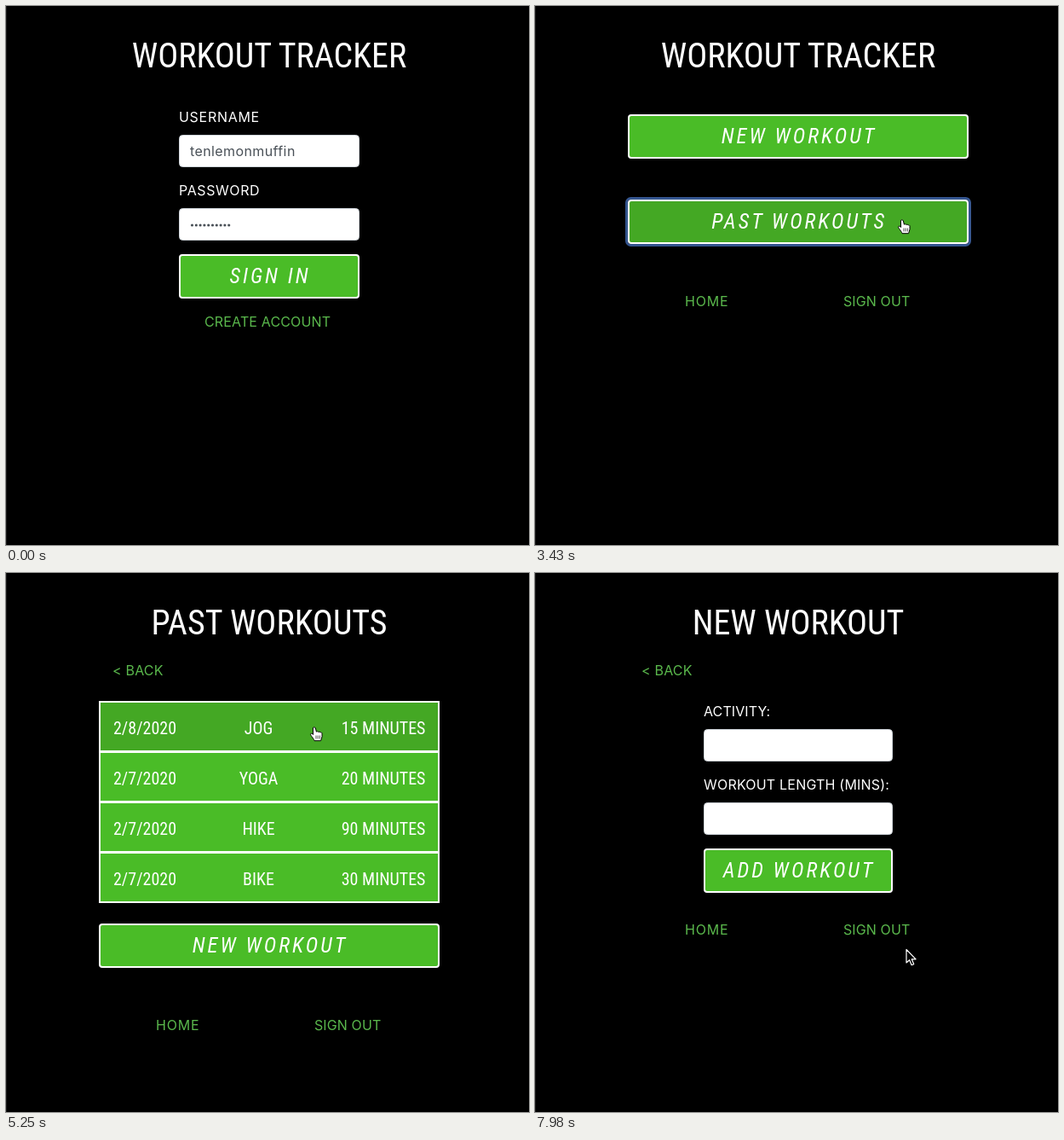
An HTML page that plays this animation: 614 by 632 pixels, repeating every 8000 ms.

```html
<!DOCTYPE html>
<html lang="en">
<head>
<meta charset="utf-8">
<title>Workout Tracker</title>
<style>
  html, body { margin: 0; width: 100%; height: 100%; overflow: hidden; background: #000; }
  svg { display: block; width: 614px; height: 632px; }
  text { fill: #fff; white-space: pre; }
  .cond { font-family: "Roboto Condensed", Roboto, sans-serif; font-stretch: condensed; }
  .sans { font-family: Montserrat, Inter, sans-serif; font-size: 16px; }
  .link { fill: #5ab84c; }
  .typed { fill: #495057; }
</style>
</head>
<body>
<svg id="stage" viewBox="0 0 614 632"></svg>
<script>
const LOOP = 8000, STEP = 70, FADE = 560;
const GREEN = "#4abc27", HOVER = "#44a824", RING = "#34558f";
const stage = document.getElementById("stage");

function el(parent, tag, attrs = {}, text) {
  const node = document.createElementNS("http://www.w3.org/2000/svg", tag);
  for (const key in attrs) node.setAttribute(key, attrs[key]);
  if (text) node.textContent = text;
  return parent.appendChild(node);
}
const show = (node, on) => node.setAttribute("visibility", on ? "visible" : "hidden");

el(stage, "rect", { width: 614, height: 632 });
el(stage, "rect", { width: 1, height: 632, fill: "#1c1c1c" });

// Narrow the regular face once if no condensed face is available.
const probe = el(stage, "text", { class: "cond", "font-size": 40 }, "WORKOUT TRACKER");
const narrow = probe.getComputedTextLength() > 345 ? 0.866 : 1;
probe.remove();

function cond(g, str, x, y, size, anchor = "middle", extra = {}) {
  return el(g, "text", {
    class: "cond", "font-size": size, "text-anchor": anchor,
    transform: `translate(${x} ${y}) scale(${narrow} 1)`, ...extra
  }, str);
}
function sans(g, str, x, y, gap = 0, kind = "") {
  return el(g, "text", { class: "sans " + kind, x, y, "letter-spacing": gap }, str);
}

function newPage(name, start, live) {
  const g = el(stage, "g");
  cond(g, name, 309, 72, 40);
  return { g, start, live, targets: [], ring: null, focus: Infinity };
}
function target(page, x, y, w, h, r) {
  const box = el(page.g, "rect", {
    x: x + 1, y: y + 1, width: w - 2, height: h - 2, rx: r,
    fill: GREEN, stroke: "#fff", "stroke-width": 2
  });
  page.targets.push({ box, x, y, w, h });
}
function button(page, label, x, y, w, focus) {
  if (focus) {
    page.focus = focus;
    page.ring = el(page.g, "rect", {
      x: x - 1.5, y: y - 1.5, width: w + 3, height: 55, rx: 5,
      fill: "none", stroke: RING, "stroke-width": 3
    });
  }
  target(page, x, y, w, 52, 3);
  cond(page.g, label, x + w / 2 + 1, y + 34, 24.8, "middle",
    { "font-style": "italic", "letter-spacing": 3 / narrow });
}
function field(page, x, y, w) {
  el(page.g, "rect", {
    x: x + .5, y: y + .5, width: w - 1, height: 37, rx: 4, fill: "#fff", stroke: "#ced4da"
  });
}
function footer(page, y) {
  sans(page.g, "HOME", 176, y, .8, "link");
  sans(page.g, "SIGN OUT", 362, y, .1, "link");
}
const back = page => sans(page.g, "< BACK", 125, 120, .2, "link");

const login = newPage("WORKOUT TRACKER", -FADE, 0);
sans(login.g, "USERNAME", 203, 136, .7);
field(login, 203, 151, 212);
sans(login.g, "tenlemonmuffin", 216, 176, .4, "typed");
sans(login.g, "PASSWORD", 203, 222, .6);
field(login, 203, 237, 212);
for (let i = 0; i < 10; i++)
  el(login.g, "circle", { cx: 218.5 + i * 4.8, cy: 257, r: 1.6, fill: "#495057" });
button(login, "SIGN IN", 203, 291, 212, 1400);
sans(login.g, "CREATE ACCOUNT", 233, 376, .15, "link");

const home = newPage("WORKOUT TRACKER", 1890, 2500);
button(home, "NEW WORKOUT", 109, 127, 400);
button(home, "PAST WORKOUTS", 109, 227, 400, 3150);
footer(home, 352);

const past = newPage("PAST WORKOUTS", 3896, 4480);
back(past);
[["2/8/2020", "JOG", 15], ["2/7/2020", "YOGA", 20],
 ["2/7/2020", "HIKE", 90], ["2/7/2020", "BIKE", 30]].forEach(([day, kind, mins], i) => {
  const y = 150 + 59 * i;
  target(past, 109, y, 400, 60, 0);
  cond(past.g, day, 126, y + 39, 20, "start");
  cond(past.g, kind, 296.5, y + 39, 20);
  cond(past.g, mins + " MINUTES", 492.5, y + 39, 20, "end");
});
button(past, "NEW WORKOUT", 109, 411, 400, 7000);
footer(past, 536);

const create = newPage("NEW WORKOUT", 7200, 7860);
back(create);
sans(create.g, "ACTIVITY:", 198, 168, .1);
field(create, 198, 183, 222);
sans(create.g, "WORKOUT LENGTH (MINS):", 198, 254, .2);
field(create, 198, 269, 222);
button(create, "ADD WORKOUT", 198, 323, 222);
footer(create, 424);

const pages = [login, home, past, create];

// Pointer
const press = el(stage, "g", { fill: "none" });
el(press, "circle", { r: 30.5, stroke: "#000", "stroke-width": 3.4 });
el(press, "circle", { r: 30.5, stroke: "#fff", "stroke-width": 1.2 });
const hand = el(stage, "g", { stroke: "#000", "stroke-width": 1, "stroke-linejoin": "round" });
el(hand, "path", {
  fill: "#fff",
  d: "M-1.6 1c0-1.6 2.6-1.6 3 0l1 4.2c.8-.8 2-.5 2.4.3.8-.6 1.9-.3 2.2.5.9-.4 2 0 2 1.3v3.4c0 1.6-1.2 3-1.4 5H0c-.3-1.6-2-3.4-3.2-5.2-1-1.5-1.6-2.4-1-3 .8-.8 2 .1 2.8 1z"
});
el(hand, "path", { fill: "none", "stroke-width": .7, d: "M2 9.5v4M4.2 9.5v4M6.4 9.5v4" });
const arrow = el(stage, "path", {
  fill: "#000", stroke: "#fff", "stroke-width": 1.2, "stroke-linejoin": "round",
  d: "M0 0V15.5l3.6-3.3 2.5 6 2.6-1.1-2.5-5.8h4.9z"
});

const track = [
  [490, 440, 470], [1190, 395, 315], [2500, 395, 315], [2940, 431, 251],
  [4480, 431, 251], [5180, 362, 181], [5460, 362, 181], [5880, 385, 240],
  [6160, 398, 300], [6440, 410, 358], [6860, 436, 447], [7800, 436, 447], [7900, 436, 441.5]
];
const clicks = [1400, 3150, 7000];

function pointerAt(t) {
  const i = track.findIndex(k => k[0] > t);
  if (i < 0) return track[track.length - 1].slice(1);
  if (i === 0) return track[0].slice(1);
  const [a, ax, ay] = track[i - 1], [b, bx, by] = track[i];
  const p = (t - a) / (b - a), e = p * p * (3 - 2 * p);
  return [ax + (bx - ax) * e, ay + (by - ay) * e];
}

function draw(time) {
  const t = Math.floor(time % LOOP / STEP) * STEP;
  const [x, y] = pointerAt(t);
  const seen = t >= track[0][0];
  const page = pages.filter(p => t >= p.start).pop();
  for (const p of pages) p.g.setAttribute("display", p === page ? "inline" : "none");

  const p = Math.min(1, (t - page.start) / FADE);
  page.g.setAttribute("opacity", 1 - (1 - p) ** 2);

  let over = false;
  for (const b of page.targets) {
    const hit = seen && t >= page.live && x > b.x && x < b.x + b.w && y > b.y && y < b.y + b.h;
    b.box.setAttribute("fill", hit ? HOVER : GREEN);
    over = over || hit;
  }
  if (page.ring) page.ring.setAttribute("display", t >= page.focus ? "inline" : "none");

  const pointing = over || t < page.live;
  show(hand, seen && pointing);
  show(arrow, seen && !pointing);
  show(press, clicks.some(c => t >= c && t < c + 140));
  for (const node of [hand, arrow, press])
    node.setAttribute("transform", `translate(${x} ${y})`);
}

const begin = performance.now();
function tick() {
  draw(performance.now() - begin);
  requestAnimationFrame(tick);
}
tick();
</script>
</body>
</html>
```
